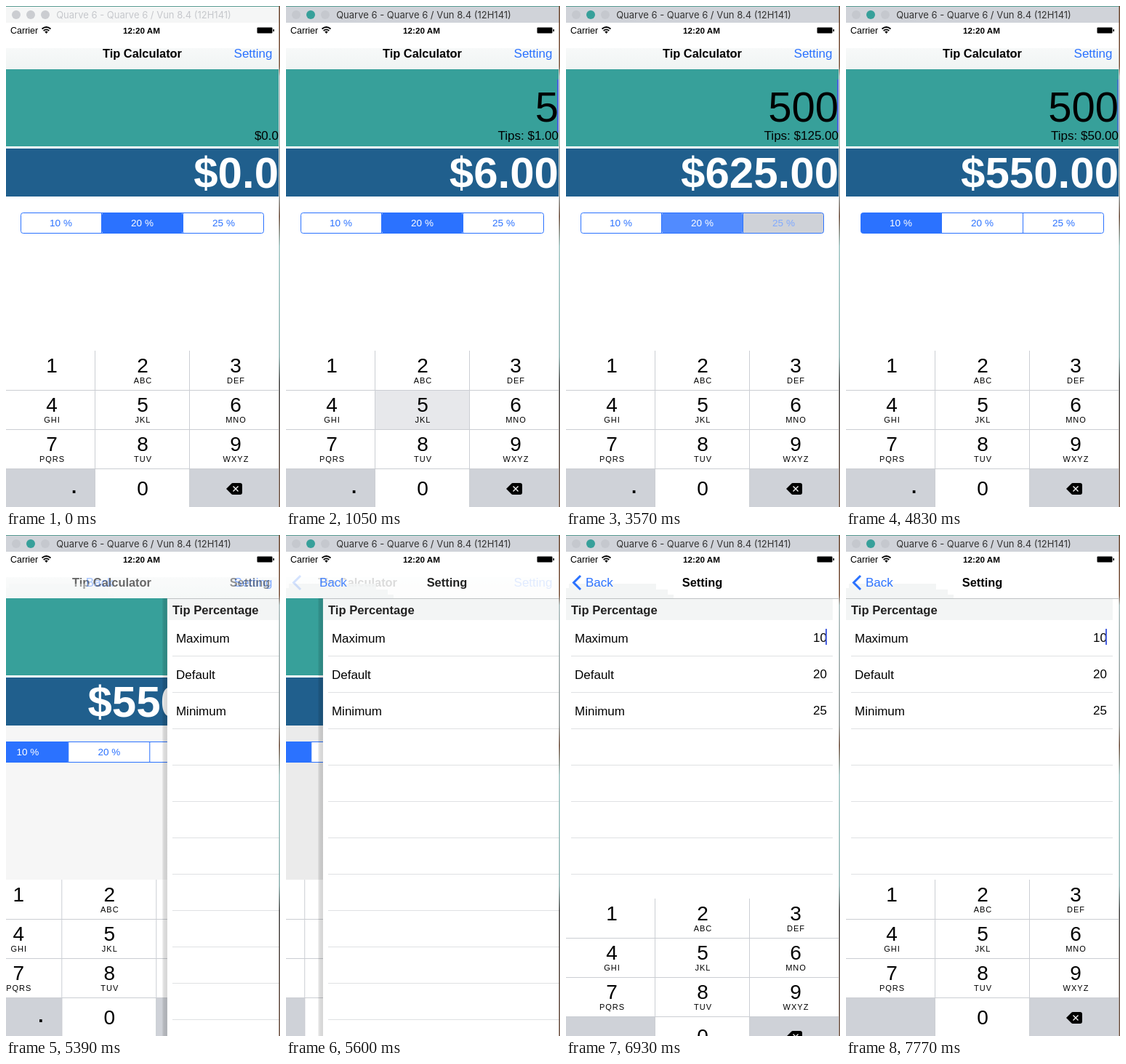
Write an HTML page that moves like this. It is 377 by 689 pixels and loops after 8000 ms.

```html
<!DOCTYPE html>
<html lang="en">
<head>
<meta charset="utf-8">
<title>Tip Calculator</title>
<style>
  html, body { margin: 0; width: 100%; height: 100%; overflow: hidden; background: #fff; }
  svg { display: block; width: 377px; height: 689px; }
  text { font: 17px "Liberation Sans", Arial, sans-serif; white-space: pre; }
  .bold { font-weight: bold; font-size: 16.4px; }
  .mid { text-anchor: middle; }
  .end { text-anchor: end; }
  .blue { fill: #2b72ff; }
  .digit { font-size: 28px; }
  .letters { font-size: 11px; letter-spacing: 1px; }
  .seg { font-size: 13.5px; }
  #title { font: 13px Inter, sans-serif; }
</style>
</head>
<body>
<svg viewBox="0 0 377 689">
  <defs>
    <linearGradient id="barShade" x2="0" y2="1">
      <stop stop-color="#f7f9f9"/><stop offset="1" stop-color="#f0f4f3"/>
    </linearGradient>
    <linearGradient id="edgeShade">
      <stop stop-opacity=".04"/><stop offset=".3" stop-opacity=".13"/><stop offset="1" stop-opacity=".17"/>
    </linearGradient>
    <linearGradient id="desktop" x2="0" y2="1">
      <stop offset=".03" stop-color="#6b452e"/><stop offset=".12" stop-color="#7b523a"/>
      <stop offset=".14" stop-color="#a9bcbc"/><stop offset=".38" stop-color="#8f9696"/>
      <stop offset=".42" stop-color="#6b4a36"/><stop offset=".48" stop-color="#9cc4c2"/>
      <stop offset=".7" stop-color="#8eb3b1"/><stop offset=".75" stop-color="#454545"/>
      <stop offset="1" stop-color="#6a4c3c"/>
    </linearGradient>
    <g id="pad">
      <path fill="#fff" d="M0 474h375v215H0z"/>
      <path fill="#cfd2d8" d="M0 636h123v53H0zM252 636h123v53H252z"/>
      <rect id="pressed" x="123" width="129" height="53" fill="#cfd2d8"/>
      <path stroke="#cbced3" d="M0 528.5H375M0 582.5H375M0 636.5H375M122.5 474V689M252.5 474V689"/>
      <g id="keys"></g>
      <text id="dot" class="digit bold mid" x="93.5" y="670" style="font-size:26px">.</text>
      <path d="M303 664l7-7q1-1 2-1h10q3 0 3 3v10q0 3-3 3h-10q-1 0-2-1z"/>
      <path stroke="#fff" stroke-width="1.3" d="M312.5 660.5l7 7m0-7l-7 7"/>
    </g>
  </defs>

  <rect width="377" height="689" fill="#fff"/>

  <g id="calc">
    <rect id="backdrop" y="87" width="500" height="602"/>
    <path fill="#37a09a" d="M0 87h375v106H0z"/>
    <path fill="#fff" d="M0 193h375v3H0z"/>
    <path fill="#205f8d" d="M0 196h375v66H0z"/>
    <text id="amount" class="end" x="375" y="158.5" style="font-size:58px"/>
    <text id="tip" class="end" x="375" y="183.5"/>
    <text id="total" class="end" x="375" y="250" fill="#fff" style="font-size:60px;font-weight:bold"/>
    <rect id="amountCursor" x="373" y="101" width="2" height="73" fill="#4a62e0"/>
    <g id="segments"></g>
    <path stroke="#2b72ff" d="M131.5 284V313M243.5 284V313"/>
    <rect x="20.5" y="284.5" width="334" height="28" rx="3" fill="none" stroke="#2b72ff"/>
    <use href="#pad"/>
  </g>

  <g id="settings">
    <rect x="-7" y="87" width="7" height="602" fill="url(#edgeShade)"/>
    <rect y="87" width="377" height="602" fill="#fff"/>
    <rect y="88" width="367" height="29" fill="#f3f5f5"/>
    <path stroke="#bfc2c4" d="M0 87.5H375"/>
    <text class="bold" x="7" y="109" style="font-size:16.6px" fill="#222">Tip Percentage</text>
    <g id="rows"></g>
    <rect id="fieldCursor" x="357" y="129" width="2" height="22" fill="#4a62e0"/>
  </g>
  <use id="lowerPad" href="#pad"/>

  <g id="nav">
    <rect y="23" width="377" height="64" fill="#fff"/>
    <g id="oldNav">
      <rect y="58" width="375" height="29" fill="url(#barShade)"/>
      <text id="oldTitle" class="bold mid" x="187.5" y="71">Tip Calculator</text>
      <text id="settingLink" class="blue end" x="366.5" y="71">Setting</text>
    </g>
    <path id="barTint" fill="#f3f5f5" d="M4 67H124V75H140V82H148V87H0V73H4z"/>
    <path id="chevron" fill="none" stroke="#2b72ff" stroke-width="3" d="M20 56l-9.5 9.5 9.5 9.5"/>
    <text id="back" class="blue" x="27" y="71">Back</text>
    <text id="newTitle" class="bold mid" x="187.5" y="71">Setting</text>
    <text x="6" y="37.5" style="font-size:12.5px">Carrier</text>
    <path fill="none" stroke="#000" stroke-width="1.8" d="M49.5 31.5q6-5 12 0M51.7 34q3.8-3.2 7.6 0"/>
    <path d="M53.3 35.5q2.2-1.8 4.4 0l-2.2 2.5z"/>
    <text class="bold mid" x="186.5" y="37.5" style="font-size:11.7px">12:20 AM</text>
    <rect x="345.5" y="29.5" width="21" height="8" rx="1"/>
    <rect x="367.5" y="32" width="1.5" height="3"/>
  </g>

  <rect id="titleBar" width="377" height="23"/>
  <rect width="377" height="1" fill="#5b9d94"/>
  <g id="lights"><circle cx="14" cy="12" r="6"/><circle cx="34" cy="12" r="6"/><circle cx="54" cy="12" r="6"/></g>
  <text id="title" class="mid" x="189.5" y="17">Quarve 6 - Quarve 6 / Vun 8.4 (12H141)</text>
  <rect x="375.5" width="1.5" height="689" fill="url(#desktop)"/>
</svg>

<script>
const LOOP = 8000, STEP = 70;
const BLUE = [43, 114, 255], WHITE = [255, 255, 255], GRAY = [207, 210, 216];
const $ = id => document.getElementById(id);
const set = (id, attrs) => { for (const k in attrs) $(id).setAttribute(k, attrs[k]); };
const clamp = v => Math.max(0, Math.min(1, v));
const mix = (a, b, p) => `rgb(${a.map((v, i) => Math.round(v + (b[i] - v) * p))})`;
const latest = (list, t) => list.filter(e => e[0] <= t).pop();

const letters = ["", "ABC", "DEF", "GHI", "JKL", "MNO", "PQRS", "TUV", "WXYZ"];
const columns = [63, 188, 316];
$("keys").innerHTML = letters.map((word, i) => {
  const x = columns[i % 3], y = 504 + 54 * Math.floor(i / 3);
  return `<text class="digit mid" x="${x}" y="${y}">${i + 1}</text>
    <text class="letters mid" x="${x + .5}" y="${y + 15}">${word}</text>`;
}).join("") + '<text class="digit mid" x="188" y="673">0</text>';

$("segments").innerHTML = [10, 20, 25].map((rate, i) =>
  `<rect id="seg${i}" x="${20.5 + 111.5 * i}" y="284.5" width="111" height="28" rx="3"/>
   <text id="label${i}" class="seg mid" x="${75.5 + 112 * i}" y="303">${rate} %</text>`).join("");

$("rows").innerHTML = [["Maximum", 10], ["Default", 20], ["Minimum", 25]].map(([name, value], i) =>
  `<text x="12" y="${148 + 50 * i}">${name}</text>
   <text class="end" x="359" y="${147 + 50 * i}">${value}</text>`).join("") +
  Array.from({ length: 11 }, (_, i) => `<path stroke="#dfe1e3" d="M7 ${166.5 + 50 * i}H367"/>`).join("");

const typed = [[-910, ""], [1050, "5"], [1540, "50"], [2030, "500"]];
const rates = [[0, .2], [3570, .25], [4410, .1]];
// press time, release time, key top
const presses = [[980, 1050, 529], [1470, 1540, 637], [1890, 2030, 637]];
// touch time, release time, old and new segment
const switches = [[3360, 3570, 1, 2], [4200, 4410, 2, 0]];

// Critically damped slide from 0 to 1
function spring(t, start, end) {
  if (t >= end) return 1;
  const s = Math.max(0, t - start) / 100;
  return 1 - (1 + s) * Math.exp(-s);
}

function blink(t, start) {
  const age = t - start, phase = age % 1120;
  if (age < 0) return 0;
  if (phase >= 560) return clamp(1 - (phase - 490) / 210);
  return age < 560 ? 1 : clamp(.5 + phase / 140);
}

function drawSegments(t) {
  const paint = (i, fill, text) => { set("seg" + i, { fill }); set("label" + i, { fill: text }); };
  const blue = mix(BLUE, BLUE, 0), white = mix(WHITE, WHITE, 0);
  const [touch, release, from, to] = latest(switches, t) || [LOOP, LOOP, 1, 1];
  for (let i = 0; i < 3; i++) paint(i, white, blue);
  if (t < release) {
    if (t >= touch) paint(to, mix(GRAY, GRAY, 0), blue);
    paint(from, blue, white);
  } else {
    const q = clamp((t - release) / 210);
    paint(from, mix(BLUE, WHITE, .18 + .82 * q), mix(WHITE, BLUE, q));
    paint(to, mix(GRAY, BLUE, q), mix(BLUE, WHITE, .4 + .6 * q));
  }
}

function drawAmounts(t) {
  const [start, text] = latest(typed, t), rate = latest(rates, t)[1];
  const tip = text * rate;
  $("amount").textContent = text;
  $("tip").textContent = text ? "Tips: $" + tip.toFixed(2) : "$0.0";
  $("total").textContent = text ? "$" + (+text + tip).toFixed(2) : "$0.0";
  set("amountCursor", { opacity: blink(t, start) });
  const [, release, y] = latest(presses, t) || [0, -LOOP, 529];
  set("pressed", { y, opacity: t < release ? 1 : t < release + STEP ? .5 : 0 });
}

function drawNavigation(t) {
  const p = spring(t, 5250, 5880), rest = 1 - p;
  const shade = Math.round(255 - 23 * p);
  set("calc", { transform: `translate(${-112 * p})` });
  set("backdrop", { fill: `rgb(${shade},${shade},${shade})` });
  set("settings", { transform: `translate(${375 * rest})`, opacity: p > 0 ? 1 : 0 });
  set("oldNav", { opacity: rest });
  set("oldTitle", { transform: `translate(${-103 * p})` });
  set("settingLink", { opacity: t >= 5110 && t < 5250 ? .25 : 1 });
  set("barTint", { opacity: p });
  set("chevron", { opacity: p ** 11 });
  set("back", { opacity: p, transform: `translate(${140 * rest})` });
  set("newTitle", { opacity: p, transform: `translate(${250 * rest})` });
  set("dot", { opacity: t < 5880 ? 1 : 0 });
  set("lowerPad", { transform: `translate(0 ${215 * (1 - spring(t, 6565, 7350))})` });
  set("fieldCursor", { opacity: blink(t, 6580) });
}

function drawWindow(active) {
  set("titleBar", { fill: active ? "#d0d3d9" : "#f5f6f6" });
  set("title", { fill: active ? "#333" : "#c6c8cc" });
  [...$("lights").children].forEach((dot, i) =>
    dot.setAttribute("fill", !active ? "#cbcdd1" : i === 1 ? "#37a09a" : "#c5c8ce"));
}

function frame(now) {
  const t = Math.floor(now % LOOP / STEP) * STEP;
  drawWindow(t >= 980);
  drawAmounts(t);
  drawSegments(t);
  drawNavigation(t);
  requestAnimationFrame(frame);
}
frame(performance.now());
</script>
</body>
</html>
```
